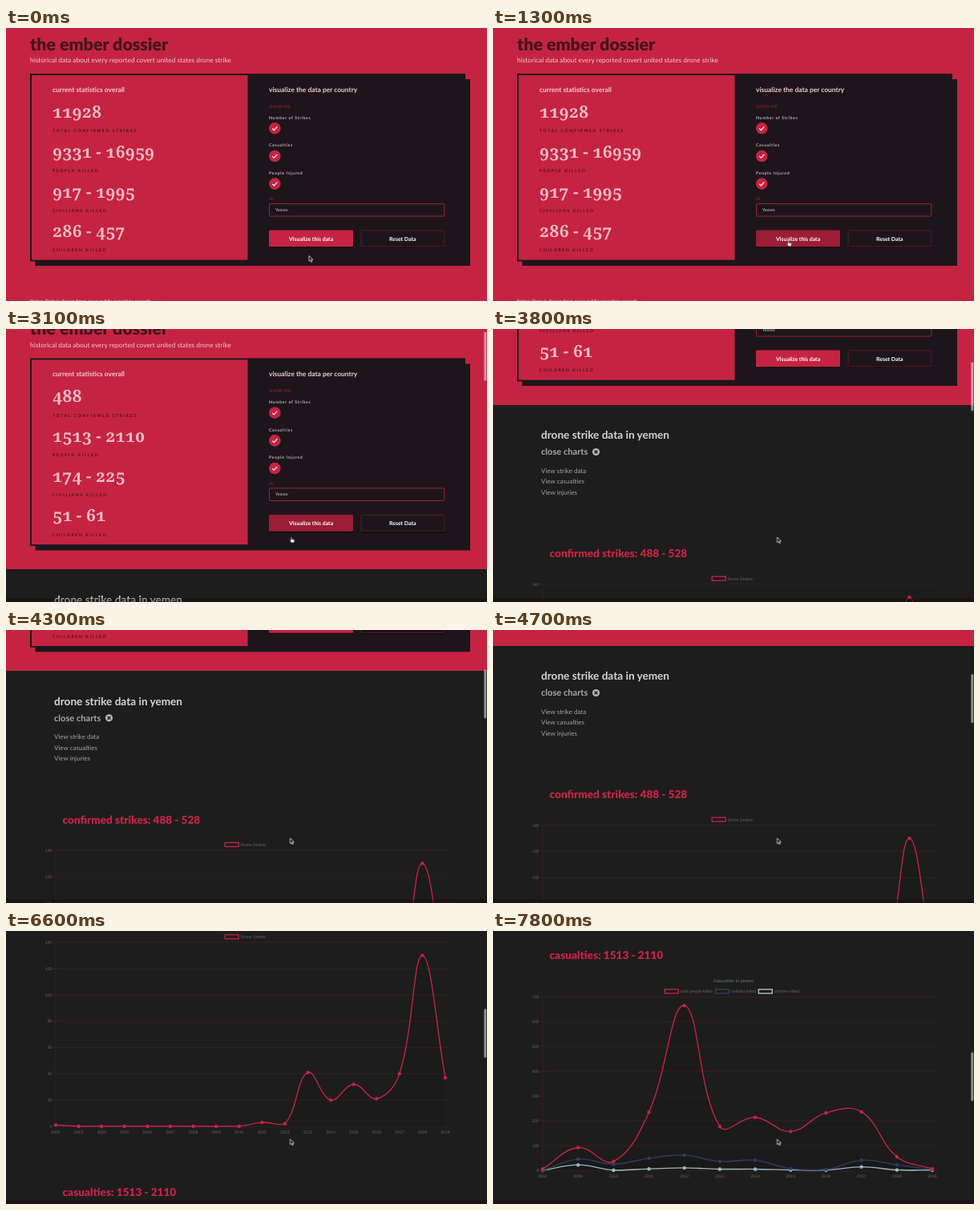
Recreate the animation shown at these times as an HTML page. Size 600x341 px, loop 8000 ms.

```html
<!DOCTYPE html>
<html lang="en">
<head>
<meta charset="utf-8">
<title>the ember dossier</title>
<style>
@property --s { syntax: "<number>"; inherits: true; initial-value: 0; }
:root { --red: #c42441; --ink: #1c161b; }
html, body { margin: 0; width: 100%; height: 100%; overflow: hidden; background: var(--red); }
svg { display: block; width: 600px; height: 341px; --s: 0; animation: scroll 8s infinite; }
text { font-family: Lato, "Open Sans", sans-serif; text-rendering: geometricPrecision; white-space: pre; }

.title { font-size: 21.4px; font-weight: 900; fill: #43151f; }
.sub { font-size: 8.35px; fill: #f0c5cc; }
.head { font-size: 8.45px; font-weight: 700; fill: #efcad1; }
.num { font: 700 20.9px "Noto Serif", Georgia, serif; font-variant-numeric: oldstyle-nums; fill: #ebbcc5; }
.cap { font-size: 5.2px; font-weight: 700; letter-spacing: 1.57px; fill: #52131f; }
.tag { font-size: 5.5px; fill: #9a1d36; }
.opt { font-size: 5.2px; font-weight: 700; letter-spacing: .64px; fill: #bdb6b9; }
.val { font-size: 5.2px; font-weight: 700; fill: #aaa3a6; }
.btn { font-size: 6.9px; font-weight: 700; fill: #fff; text-anchor: middle; }
.foot { font-size: 5.6px; font-weight: 700; letter-spacing: .2px; fill: #f0c5cc; }
.h1 { font-size: 13.6px; font-weight: 700; fill: #d6d4d4; }
.h2 { font-size: 11.1px; font-weight: 700; fill: #a8a6a6; }
.link { font-size: 8px; fill: #a3a1a1; }
.sum { font-size: 13.6px; font-weight: 900; fill: var(--red); }
.tick { font: 5.2px "Liberation Sans", Arial, sans-serif; fill: #646464; }
.mid { text-anchor: middle; }
.end { text-anchor: end; }
.bold { font-weight: 700; }

#page { transform: translateY(calc(var(--s) * -1px)); }
#thumb { transform: translateY(calc(var(--s) * .1833px)); animation: bar 8s step-end infinite; }
#go { fill: var(--red); animation: hover 8s linear infinite; }
#cursor { animation: move 8s infinite; }
#arrow { animation: arrow 8s step-end infinite; }
#hand { animation: hand 8s step-end infinite; }
.before { animation: before 8s step-end infinite; }
.after { animation: after 8s step-end infinite; }

@keyframes scroll {
  0%, 38.1% { --s: 0; animation-timing-function: cubic-bezier(.3, .3, .3, 1); }
  46.9%, 51.9% { --s: 226; animation-timing-function: cubic-bezier(.3, .3, .3, 1); }
  57.5%, 58.8% { --s: 301; animation-timing-function: cubic-bezier(.3, .5, .4, 1); }
  61.2%, 67.7% { --s: 369.5; animation-timing-function: cubic-bezier(.2, .6, .3, 1); }
  76.2%, 82.7% { --s: 530.5; animation-timing-function: cubic-bezier(.2, .7, .3, 1); }
  93.7%, 100% { --s: 826; }
}
@keyframes move {
  0%, 1.2% { transform: translate(378px, 284.5px); animation-timing-function: ease-in-out; }
  11.2% { transform: translate(371px, 267.5px); animation-timing-function: ease-in-out; }
  26.2%, 100% { transform: translate(354.5px, 260px); }
}
@keyframes hover {
  0%, 9.4% { fill: #c42441; }
  12.5%, 39.5% { fill: #9c1d36; }
  42%, 100% { fill: #c42441; }
}
@keyframes arrow { 0% { opacity: 1; } 9.4% { opacity: 0; } 39.5%, 100% { opacity: 1; } }
@keyframes hand { 0% { opacity: 0; } 9.4% { opacity: 1; } 39.5%, 100% { opacity: 0; } }
@keyframes before { 0% { opacity: 1; } 33.75%, 100% { opacity: 0; } }
@keyframes after { 0% { opacity: 0; } 33.75%, 100% { opacity: 1; } }
@keyframes bar { 0% { opacity: 0; } 38.1%, 100% { opacity: 1; } }
</style>
</head>
<body>
<svg viewBox="0 0 600 341">
  <defs>
    <g id="check">
      <circle r="7.3" fill="#c42441"/>
      <path d="M-3 .2 -.9 2.3 3.1 -2.2" fill="none" stroke="#fff" stroke-width="1.1"/>
    </g>
  </defs>
  <rect width="600" height="341" fill="#c42441"/>
  <g id="page">
    <text class="title" x="30" y="28">the ember dossier</text>
    <text class="sub" x="30" y="43.2">historical data about every reported covert united states drone strike</text>

    <path d="M30 57H573V64H579V297H36.5V291.5H30Z" fill="#1c161b"/>
    <rect x="32" y="59" width="269.5" height="230.7" fill="#c42441"/>

    <text class="head" x="58" y="80">current statistics overall</text>
    <g class="num before">
      <text class="num" x="58" y="112">11928</text>
      <text class="num" x="58" y="162">9331 - 16959</text>
      <text class="num" x="58" y="211.5">917 - 1995</text>
      <text class="num" x="58" y="261">286 - 457</text>
    </g>
    <g class="num after">
      <text class="num" x="58" y="112">488</text>
      <text class="num" x="58" y="162">1513 - 2110</text>
      <text class="num" x="58" y="211.5">174 - 225</text>
      <text class="num" x="58" y="261">51 - 61</text>
    </g>
    <text class="cap" x="58" y="130.3">TOTAL CONFIRMED STRIKES</text>
    <text class="cap" x="58" y="180">PEOPLE KILLED</text>
    <text class="cap" x="58" y="229.8">CIVILIANS KILLED</text>
    <text class="cap" x="58" y="279.3">CHILDREN KILLED</text>

    <text class="head" x="328" y="80">visualize the data per country</text>
    <text class="tag" x="328" y="99.6">SHOW ME</text>
    <text class="opt" x="328" y="113.7">Number of Strikes</text>
    <text class="opt" x="328" y="148.4">Casualties</text>
    <text class="opt" x="328" y="183">People Injured</text>
    <use href="#check" x="335.3" y="125.3"/>
    <use href="#check" x="335.3" y="160"/>
    <use href="#check" x="335.3" y="194.6"/>
    <text class="tag" x="328" y="215.4">IN</text>
    <rect x="328.5" y="219.5" width="218.3" height="15.6" rx="1.5" fill="none" stroke="#a31f38"/>
    <text class="val" x="336" y="229">Yemen</text>

    <rect x="328" y="254" width="105.5" height="21" rx="2" fill="#0f0a0d"/>
    <rect id="go" x="328" y="252.5" width="105" height="20.8" rx="1.5"/>
    <text class="btn" x="380.6" y="265.6">Visualize this data</text>
    <rect x="443" y="254" width="104.5" height="21" rx="2" fill="#0f0a0d"/>
    <rect x="443" y="252.8" width="104" height="20.4" rx="1.5" fill="#1c161b" stroke="#6e1a2c" stroke-width=".8"/>
    <text class="btn" x="494.8" y="265.6">Reset Data</text>

    <text class="foot" x="30" y="343.4">Notes: Data is drawn from open public reporting records</text>

    <g class="after">
      <rect y="321" width="600" height="1540" fill="#1d1d1d"/>
      <text class="h1" x="60" y="363.3">drone strike data in yemen</text>
      <text class="h2" x="60" y="383.3">close charts</text>
      <circle cx="128.5" cy="379.5" r="4.6" fill="#b5b3b3"/>
      <path d="M126.7 377.7l3.6 3.6m0-3.6l-3.6 3.6" stroke="#1d1d1d" stroke-width="1.4"/>
      <text class="link" x="60" y="405.8">View strike data</text>
      <text class="link" x="60" y="419.2">View casualties</text>
      <text class="link" x="60" y="432.6">View injuries</text>
      <text class="sum" x="70.5" y="511.3">confirmed strikes: 488 - 528</text>
      <g id="strikes"></g>
      <text class="sum" x="70.5" y="861">casualties: 1513 - 2110</text>
      <text class="tick mid bold" x="300" y="889.8">Casualties in yemen</text>
      <g id="deaths"></g>
    </g>
  </g>
  <rect class="after" y="336.5" width="600" height="5" fill="#14080e" fill-opacity=".4"/>
  <rect id="thumb" x="596.3" y="0" width="3" height="61" rx="1.5" fill="#fff" fill-opacity=".5"/>
  <g id="cursor">
    <path id="arrow" d="M0 0V6.7L1.6 5.3 2.6 7.7 3.8 7.2 2.8 4.9H4.9Z" fill="#151515" stroke="#fff" stroke-width=".7"/>
    <path id="hand" d="M.6 .2Q1.4-.4 1.9.5L2.3 2.4 4.6 3Q5.6 3.3 5.3 4.6L4.7 7H1.8L-.5 4.4Q-.5 3.4.9 4Z" fill="#fff" stroke="#151515" stroke-width=".6"/>
  </g>
</svg>
<script>
const LEFT = 62, RIGHT = 548;

const line = (x1, y1, x2, y2) =>
  `<path d="M${x1} ${y1}L${x2} ${y2}" stroke="#c42441" stroke-opacity=".24" stroke-width=".7"/>`;
const label = (x, y, str, cls = "") => `<text class="tick ${cls}" x="${x}" y="${y}">${str}</text>`;

// Cardinal spline whose handles stay inside the plot area
function spline(pts, top, bottom, tension = 0.4) {
  const cap = y => Math.min(bottom, Math.max(top, y));
  const handles = pts.map((p, i) => {
    const a = pts[i - 1] || p, b = pts[i + 1] || p;
    const da = Math.hypot(p[0] - a[0], p[1] - a[1]);
    const db = Math.hypot(b[0] - p[0], b[1] - p[1]);
    const ka = tension * da / (da + db), kb = tension * db / (da + db);
    const dx = b[0] - a[0], dy = b[1] - a[1];
    return [[p[0] - ka * dx, cap(p[1] - ka * dy)], [p[0] + kb * dx, cap(p[1] + kb * dy)]];
  });
  return pts.map((p, i) => i ? `C${handles[i - 1][1]} ${handles[i][0]} ${p}` : `M${p}`).join("");
}

function chart(id, { top, bottom, max, step, years, legendY, sets }) {
  const toX = i => LEFT + (RIGHT - LEFT) * i / (years.length - 1);
  const toY = v => bottom - (bottom - top) * v / max;
  let out = line(LEFT, top, LEFT, bottom + 4);
  for (let v = 0; v <= max; v += step) {
    out += line(LEFT - 4, toY(v), 555, toY(v)) + label(57.5, toY(v) + 1.8, v, "end");
  }
  years.forEach((year, i) => out += label(toX(i), bottom + 8.6, year, "mid"));
  // The first set lies on top
  for (const { color, data } of [...sets].reverse()) {
    const pts = data.map((v, i) => [toX(i), toY(v)]);
    const d = spline(pts, top, bottom);
    out += `<path d="${d}L${RIGHT} ${bottom}L${LEFT} ${bottom}Z" fill="#000" fill-opacity=".06"/>`;
    out += `<path d="${d}" fill="none" stroke="${color}" stroke-width="1.35"/>`;
    for (const [x, y] of pts) out += `<circle cx="${x}" cy="${y}" r="2.2" fill="${color}"/>`;
  }
  for (const { color, name, x } of sets) {
    out += `<rect x="${x}" y="${legendY - 2.5}" width="17" height="5" fill="none" stroke="${color}" stroke-width="1.3"/>`;
    out += label(x + 19.3, legendY + 1.9, name);
  }
  document.getElementById(id).innerHTML = out;
}

const range = (a, b) => Array.from({ length: b - a + 1 }, (_, i) => a + i);

chart("strikes", {
  top: 544.7, bottom: 774.5, max: 140, step: 20, legendY: 537.7,
  years: range(2002, 2019),
  sets: [{
    color: "#c42441", name: "Drone Strikes", x: 273.2,
    data: [1, 0, 0, 0, 0, 0, 0, 0, 0, 3, 2, 41, 20, 32, 21, 40, 130, 37]
  }]
});

chart("deaths", {
  top: 908.3, bottom: 1125, max: 700, step: 100, legendY: 901.4,
  years: [2002, ...range(2009, 2019)],
  sets: [
    { color: "#c42441", name: "total people killed", x: 214.3,
      data: [6, 92, 36, 235, 665, 177, 214, 157, 232, 236, 55, 6] },
    { color: "#2f3f6b", name: "civilians killed", x: 277.3,
      data: [0, 45, 25, 49, 61, 36, 41, 7, 4, 41, 22, 3] },
    { color: "#a9cfe0", name: "children killed", x: 331.3,
      data: [0, 22, 1, 6, 10, 5, 5, 2, 1, 14, 2, 1] }
  ]
});
</script>
</body>
</html>
```
